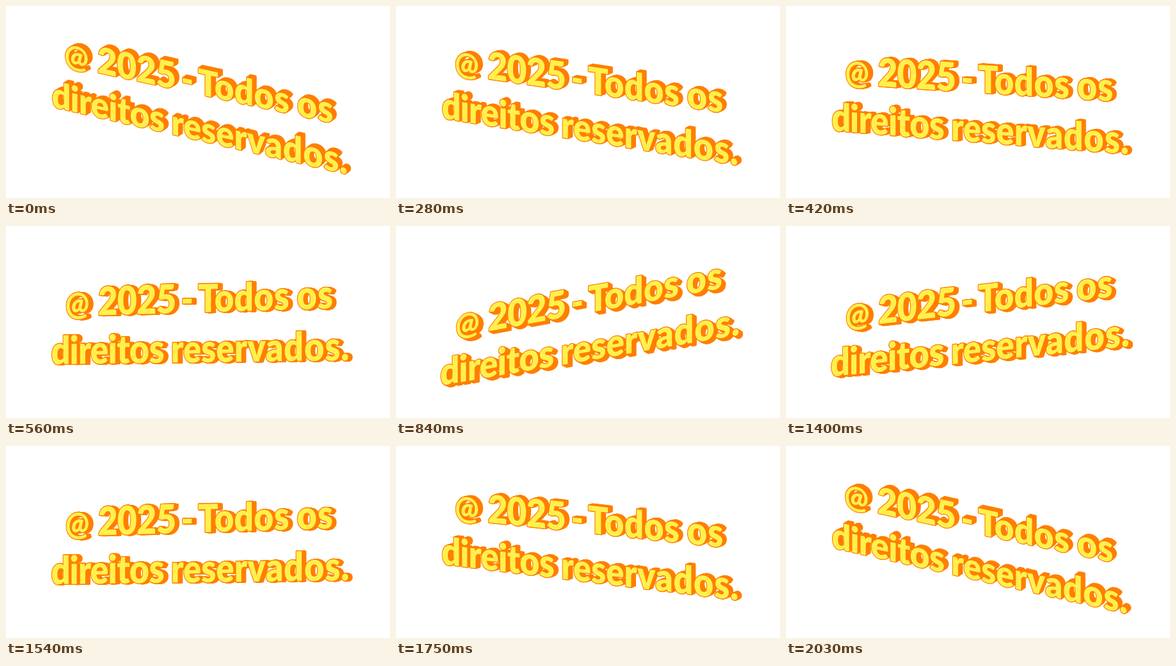
These frames come from a looping animation (600x300 px, 2100 ms). An HTML page with a canvas:

```html
<!DOCTYPE html>
<html lang="pt">
<head>
<meta charset="utf-8">
<title>Todos os direitos reservados</title>
<style>
html, body { margin: 0; width: 100%; height: 100%; overflow: hidden; background: #fff; }
canvas { display: block; }
</style>
</head>
<body>
<canvas id="stage" width="600" height="300" role="img" aria-label="@ 2025 - Todos os direitos reservados."></canvas>
<script>
const ctx = document.getElementById('stage').getContext('2d');
const LOOP = 2100, STEP = 70;
const CX = 309, CY = 163, CAMERA = 2800, DEPTH = 13;
const YAW = Math.PI / 6, TILT = 22.3 * Math.PI / 180;
const SIDE = '#ff7f00', FACE = '#fff04d';
const sinYaw = Math.sin(YAW), cosYaw = Math.cos(YAW);

// text, centre x, baseline y, font size
const words = [
  ['@', -233.5, -29, 53],
  ['2025', -119.5, -28, 63],
  ['-', -26, -28, 60],
  ['Todos', 73.7, -28, 60],
  ['os', 196.7, -28, 60],
  ['direitos', -176, 50, 63],
  ['reservados.', 99.2, 50, 60]
];

const fontOf = size => `900 ${size}px Lato, "Open Sans", sans-serif`;

function layOut([text, cx, y, size]) {
  ctx.font = fontOf(size);
  const left = cx - ctx.measureText(text).width / 2;
  return [...text].map((ch, i) => {
    const end = ctx.measureText(text.slice(0, i + 1)).width;
    return { ch, y, size, x: left + end - ctx.measureText(ch).width / 2 };
  });
}

const glyphs = words.flatMap(layOut);

// Turn about the vertical axis, then tilt about the horizontal one.
function place(g, z, sinT, cosT) {
  const x1 = g.x * cosYaw - z * sinYaw;
  const z1 = g.x * sinYaw + z * cosYaw;
  const y2 = g.y * cosT + z1 * sinT;
  const z2 = z1 * cosT - g.y * sinT;
  const m = CAMERA / (CAMERA - z2);
  ctx.setTransform(m * cosYaw, m * sinYaw * sinT, 0, m * cosT, CX + m * x1, CY + m * y2);
  ctx.font = fontOf(g.size);
}

function draw(time) {
  const tilt = TILT * Math.cos(2 * Math.PI * time / LOOP);
  const sinT = Math.sin(tilt), cosT = Math.cos(tilt);
  ctx.setTransform(1, 0, 0, 1, 0, 0);
  ctx.fillStyle = '#fff';
  ctx.fillRect(0, 0, 600, 300);
  ctx.textAlign = 'center';
  ctx.textBaseline = 'alphabetic';
  ctx.lineJoin = 'round';
  ctx.lineWidth = 2.6;
  ctx.strokeStyle = ctx.fillStyle = SIDE;
  for (let z = -DEPTH / 2; z <= DEPTH / 2; z++) {
    for (const g of glyphs) {
      place(g, z, sinT, cosT);
      ctx.strokeText(g.ch, 0, 0);
      ctx.fillText(g.ch, 0, 0);
    }
  }
  ctx.fillStyle = FACE;
  for (const g of glyphs) {
    place(g, DEPTH / 2, sinT, cosT);
    ctx.fillText(g.ch, 0, 0);
  }
}

let shown = -1;
function tick() {
  const step = Math.floor(performance.now() % LOOP / STEP);
  if (step !== shown) {
    shown = step;
    draw(step * STEP);
  }
  requestAnimationFrame(tick);
}
tick();
</script>
</body>
</html>
```
